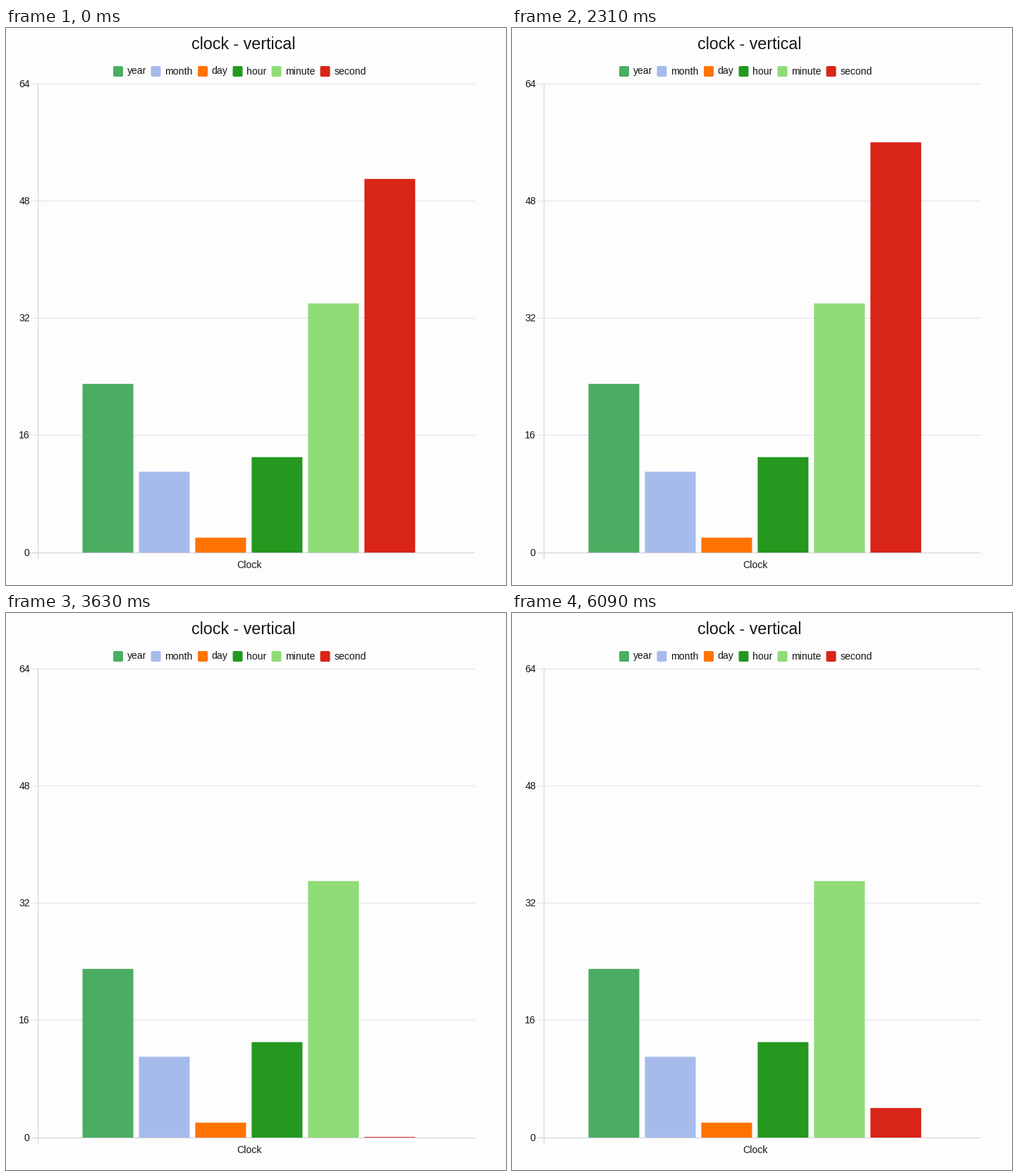
Write a matplotlib script that moves like this. It is 709x790 px and loops after 6.12 s.

```python
import matplotlib.pyplot as plt
from matplotlib.animation import FuncAnimation
from matplotlib.patches import FancyBboxPatch, Rectangle

W, H, DPI = 709, 790, 64
FRAME_MS, FRAMES = 30, 204
FIRST_TICK, TICK = 30, 3600 / 7    # ms between chart refreshes

BASE, UNIT = 743.6, 664.5 / 64     # zero level and pixels per value
LEFT, RIGHT = 45.5, 665
GRID, AXIS, INK = "#e0dfea", "#d0ced9", "#151515"

# name, colour, value, legend x
SERIES = [
    ("year", "#4bad62", 23, 152),
    ("month", "#a6bbec", 11, 205.5),
    ("day", "#ff7300", 2, 272),
    ("hour", "#24981f", 13, 321.5),
    ("minute", "#8fdc77", 34, 376.5),
    ("second", "#d92517", 51, 445.5),
]
# The refresh runs slightly slower than a second, so 59 is skipped.
SECONDS = [*range(51, 59), *range(5)]

fig = plt.figure(figsize=(W / DPI, H / DPI), dpi=DPI, facecolor="#fdfdfd")
ax = fig.add_axes([0, 0, 1, 1])
ax.set_xlim(0, W)
ax.set_ylim(H, 0)
ax.axis("off")


def text(x, y, s, size=14, ha="left"):
    ax.text(x, y, s, fontsize=size * 72 / DPI, family="Liberation Sans",
            color=INK, ha=ha, va="baseline")


def line(xs, ys, color):
    ax.plot(xs, ys, color=color, lw=72 / DPI, solid_capstyle="butt",
            snap=False, zorder=1)


def set_value(bar, value):
    height = max(value * UNIT, 0.5)
    bar.set_y(BASE - height)
    bar.set_height(height + 0.4)


text(336.5, 29.5, "clock - vertical", 23.2, "center")

for value in range(0, 65, 16):
    y = round(BASE - value * UNIT - 0.1) + 0.5
    color = GRID if value else AXIS
    line([36, RIGHT], [y, y], color)
    text(33.7, y + 4.5, str(value), ha="right")
line([LEFT, LEFT], [79, 753], AXIS)
text(344.5, 766, "Clock", ha="center")

bars = []
for i, (name, color, value, x) in enumerate(SERIES):
    ax.add_patch(FancyBboxPatch((x + 2, 56), 10, 11, lw=0, fc=color,
                                boxstyle="round,pad=2,rounding_size=2"))
    text(x + 19.7, 65.5, name)
    bar = Rectangle((108.5 + 79.95 * i, 0), 72, 0, lw=0, fc=color,
                    snap=False, zorder=3)
    set_value(bar, value)
    bars.append(ax.add_patch(bar))


def update(frame):
    t = frame * FRAME_MS
    ticks = int((t - FIRST_TICK + 1e-6) // TICK) + 1
    second = SECONDS[min(ticks, len(SECONDS) - 1)]
    set_value(bars[4], 34 if second > 50 else 35)
    set_value(bars[5], second)
    return bars


anim = FuncAnimation(fig, update, frames=FRAMES, interval=FRAME_MS,
                     repeat=True, repeat_delay=0, blit=False)
plt.show()
```
